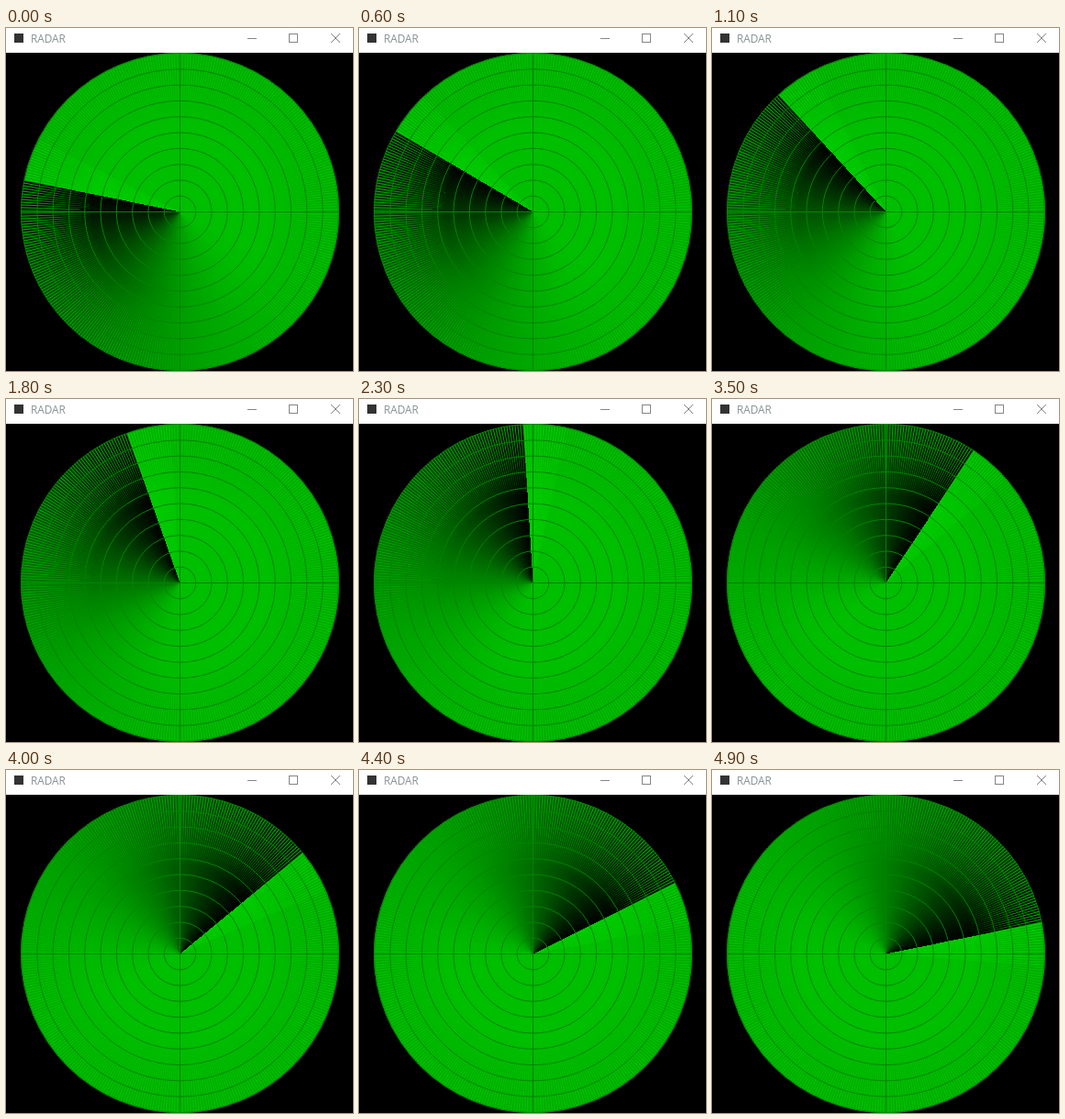
An HTML page with a canvas that plays this animation: 378 by 374 pixels, repeating every 5000 ms.

```html
<!DOCTYPE html>
<html lang="en">
<head>
<meta charset="utf-8">
<title>RADAR</title>
<style>
  html, body { margin: 0; width: 100%; height: 100%; overflow: hidden; background: #000; }
  canvas, svg { position: absolute; left: 0; top: 0; display: block; }
  text { font: 11.8px "Open Sans", "Noto Sans", sans-serif; fill: #879292; }
</style>
</head>
<body>
<canvas id="radar" width="378" height="374"></canvas>
<svg width="378" height="27" viewBox="0 0 378 27">
  <rect width="378" height="27" fill="#fff"/>
  <rect x="9" y="6" width="10" height="10" fill="#333"/>
  <text x="27" y="16">RADAR</text>
  <g fill="none" stroke="#858585">
    <path d="M263 11.5h10"/>
    <rect x="308.5" y="6.5" width="9" height="9"/>
    <path d="M354 6l10 10M364 6l-10 10"/>
  </g>
</svg>
<script>
const ctx = document.getElementById("radar").getContext("2d");
const CX = 189.5, CY = 200.5, R = 173.5;
const RINGS = 10, STEP = 100, FRAMES = 50;
const DEG = Math.PI / 180;
const BRIGHT_SPAN = 16, FADE_SPAN = 170;

// [step, degrees clockwise from the top]
const SWEEP = [[0, 281.2], [11, 317.3], [18, 340.6], [28, 372.2], [35, 393.1], [40, 410.6], [49, 438.5]];

const green = v => `rgb(0,${Math.round(v)},0)`;

function sweepAngle(step) {
  let i = 1;
  while (SWEEP[i][0] < step) i++;
  const [s0, a0] = SWEEP[i - 1], [s1, a1] = SWEEP[i];
  return Math.floor(a0 + (a1 - a0) * (step - s0) / (s1 - s0)) + 0.5;
}

// Level at a number of degrees ahead of the sweep; the trail fades back in.
function level(ahead) {
  const age = 360 - ahead;
  return 190 * Math.sin(Math.PI / 2 * Math.min(1, age / FADE_SPAN));
}

function makeSpokes() {
  const path = new Path2D();
  const inner = 95, half = 0.6 / R;
  for (let d = 0; d < 360; d++) {
    const a = (d + 0.5) * DEG;
    path.moveTo(CX + inner * Math.cos(a), CY + inner * Math.sin(a));
    path.lineTo(CX + R * Math.cos(a - half), CY + R * Math.sin(a - half));
    path.lineTo(CX + R * Math.cos(a + half), CY + R * Math.sin(a + half));
    path.closePath();
  }
  return path;
}

function makeGrid() {
  const path = new Path2D();
  for (let i = 1; i <= RINGS; i++) {
    const r = i * (R - 0.5) / RINGS;
    path.moveTo(CX + r, CY);
    path.arc(CX, CY, r, 0, 2 * Math.PI);
  }
  path.moveTo(CX - R, CY);
  path.lineTo(CX + R, CY);
  path.moveTo(CX, CY - R);
  path.lineTo(CX, CY + R);
  return path;
}

const spokes = makeSpokes(), grid = makeGrid();

function draw(ms) {
  const step = Math.floor(ms / STEP) % FRAMES;
  const fill = ctx.createConicGradient((sweepAngle(step) - 90) * DEG, CX, CY);
  fill.addColorStop(0, green(202));
  fill.addColorStop(BRIGHT_SPAN / 360, green(197));
  fill.addColorStop(BRIGHT_SPAN / 360, green(190));
  for (let d = 180; d <= 360; d += 5) fill.addColorStop(d / 360, green(level(d)));

  ctx.fillStyle = "#000";
  ctx.fillRect(0, 0, 378, 374);
  ctx.fillStyle = fill;
  ctx.beginPath();
  ctx.arc(CX, CY, R, 0, 2 * Math.PI);
  ctx.fill();
  ctx.fillStyle = green(165);
  ctx.fill(spokes);
  ctx.strokeStyle = green(132);
  ctx.lineWidth = 1;
  ctx.stroke(grid);
}

const start = performance.now();
function tick() {
  draw(performance.now() - start);
  requestAnimationFrame(tick);
}
tick();
</script>
</body>
</html>
```
